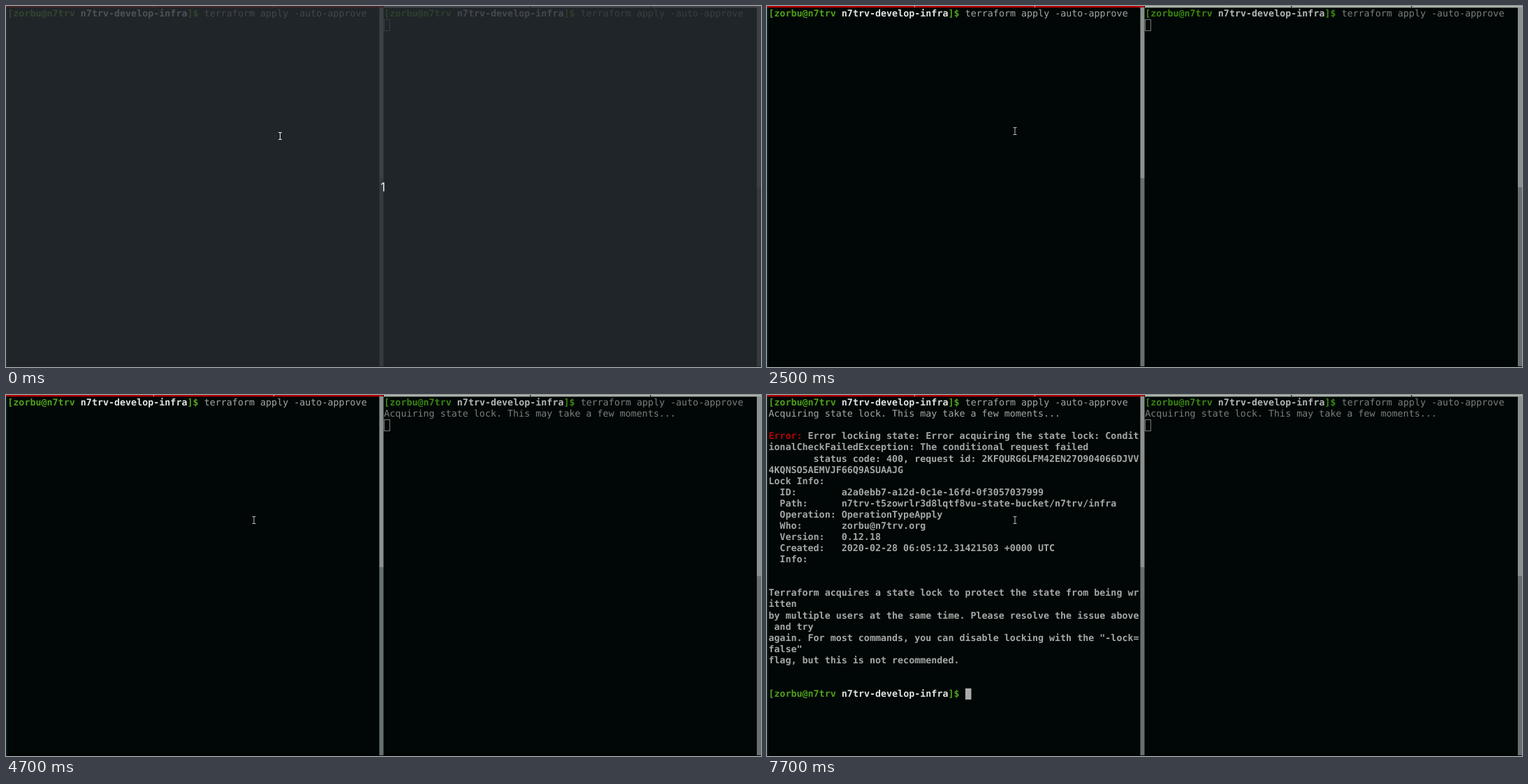
Recreate the animation shown at these times as an HTML page with a canvas. Size 1081x518 px, loop 8000 ms.

```html
<!DOCTYPE html>
<html lang="en">
<head>
<meta charset="utf-8">
<title>Terraform state lock</title>
<style>
html, body { margin: 0; width: 100%; height: 100%; overflow: hidden; background: #000706; }
canvas { display: block; }
</style>
</head>
<body>
<canvas id="stage" width="1081" height="518"></canvas>
<script>
const ctx = document.getElementById('stage').getContext('2d');
const LOOP = 8000, SIZE = 13.35, COL = 8.04, ROW = 16.07;
const FONT = `${SIZE}px "DejaVu Sans Mono", monospace`;
const BACK = '#000706';

const LEFT = { x: 2.3, green: '#4fa01c', white: '#e2e5e3', text: '#a5a8a5', red: '#b00505' };
const RIGHT = { x: 541.3, green: '#3b8412', white: '#b3b6b3', text: '#7a7f7c' };

const COMMAND = 'terraform apply -auto-approve';
const WAITING = 'Acquiring state lock. This may take a few moments...';
const ERROR = `       Error locking state: Error acquiring the state lock: Condit
ionalCheckFailedException: The conditional request failed
        status code: 400, request id: 2KFQURG6LFM42EN27O904066DJVV
4KQNSO5AEMVJF66Q9ASUAAJG
Lock Info:
  ID:        a2a0ebb7-a12d-0c1e-16fd-0f3057037999
  Path:      n7trv-t5zowrlr3d8lqtf8vu-state-bucket/n7trv/infra
  Operation: OperationTypeApply
  Who:       zorbu@n7trv.org
  Version:   0.12.18
  Created:   2020-02-28 06:05:12.31421503 +0000 UTC
  Info:


Terraform acquires a state lock to protect the state from being wr
itten
by multiple users at the same time. Please resolve the issue above
 and try
again. For most commands, you can disable locking with the "-lock=
false"
flag, but this is not recommended.`.split('\n');

function rect(x, y, w, h, color) {
  ctx.fillStyle = color;
  ctx.fillRect(x, y, w, h);
}

function write(pane, col, row, string, color, bold) {
  ctx.font = (bold ? 'bold ' : '') + FONT;
  ctx.fillStyle = color;
  ctx.fillText(string, pane.x + col * COL, 15.2 + row * ROW);
}

function prompt(pane, row) {
  write(pane, 0, row, '[zorbu@n7trv', pane.green, true);
  write(pane, 13, row, 'n7trv-develop-infra', pane.white, true);
  write(pane, 32, row, ']$', pane.green, true);
}

function blockCursor(col, row) {
  rect(Math.round(2.4 + col * COL), Math.round(3 + row * ROW), 8.5, 16, '#a9aca9');
}

function hollowCursor(row) {
  ctx.strokeStyle = '#747a77';
  ctx.lineWidth = 1;
  ctx.strokeRect(541.5, Math.round(3 + row * ROW) + 0.5, 8, 16);
}

function pointer(x, y, color) {
  rect(x - 0.5, y - 5, 1, 10, color);
  rect(x - 2.5, y - 5.5, 5, 1, color);
  rect(x - 2.5, y + 4.5, 5, 1, color);
}

function frame() {
  rect(0, 0, 1081, 518, BACK);
  rect(0, 0, 2, 518, '#031c1f');
  rect(0, 0, 540, 2.4, '#b00000');
  rect(541, 0, 540, 2.4, '#a9b2a8');
  for (const x of [211, 383]) rect(x, 0, 1, 2, '#d8a8a0');
  for (const x of [750, 922]) rect(x, 0, 1.5, 2.4, '#20302c');
  for (const [x, split] of [[534.5, 247], [1075, 260]]) {
    rect(x, 2, 6, split - 2, '#8b918e');
    rect(x, split, 6, 517 - split, '#677070');
  }
}

// Where the solid cursor stands, or null while it is blinked off.
function leftCursor(t) {
  const within = (from, to) => t >= from && t < to;
  if (within(500, 1000)) return [36, 0];
  if (within(1000, 1100) || within(1700, 2500) || within(2900, 4000) || within(4100, 4700)) return [0, 1];
  if (within(5300, 5900)) return [0, 2];
  if (within(6700, 7100) || t >= 7700) return [35, 26];
  return null;
}

function drawLeft(t) {
  prompt(LEFT, 0);
  write(LEFT, 35, 0, COMMAND, LEFT.text);
  if (t >= 5100) write(LEFT, 0, 1, WAITING, LEFT.text);
  if (t >= 6700) {
    write(LEFT, 0, 3, 'Error:', LEFT.red, true);
    ERROR.forEach((line, i) => write(LEFT, 0, 3 + i, line, LEFT.text, true));
    prompt(LEFT, 26);
  }
  const cursor = leftCursor(t);
  if (cursor) {
    blockCursor(...cursor);
    if (cursor[1] === 0) write(LEFT, 36, 0, COMMAND[1], BACK);
  }
}

function drawRight(t) {
  prompt(RIGHT, 0);
  write(RIGHT, 35, 0, COMMAND, RIGHT.text);
  if (t >= 2700) write(RIGHT, 0, 1, WAITING, RIGHT.text);
  hollowCursor(t >= 2700 ? 2 : 1);
}

function countdown() {
  rect(0, 0, 1081, 518, 'rgba(40, 45, 51, 0.8)');
  ctx.font = '18px "Open Sans", sans-serif';
  ctx.fillStyle = '#fff';
  ctx.textAlign = 'center';
  ctx.fillText('1', 540.5, 266);
  ctx.textAlign = 'left';
  pointer(392.5, 186.5, '#e4e6e6');
}

function draw(now) {
  const t = now % LOOP;
  ctx.textRendering = 'geometricPrecision';
  frame();
  drawLeft(t);
  drawRight(t);
  if (t < 500) countdown();
  if (t >= 1800) {
    const left = 1 - Math.min(1, Math.floor((t - 1800) / 100) / 4);
    pointer(355 - 10 * left * left, 179.5 - 9 * left * left, '#b9bcba');
  }
}

const start = performance.now();
function tick() {
  draw(performance.now() - start);
  requestAnimationFrame(tick);
}
tick();
</script>
</body>
</html>
```
